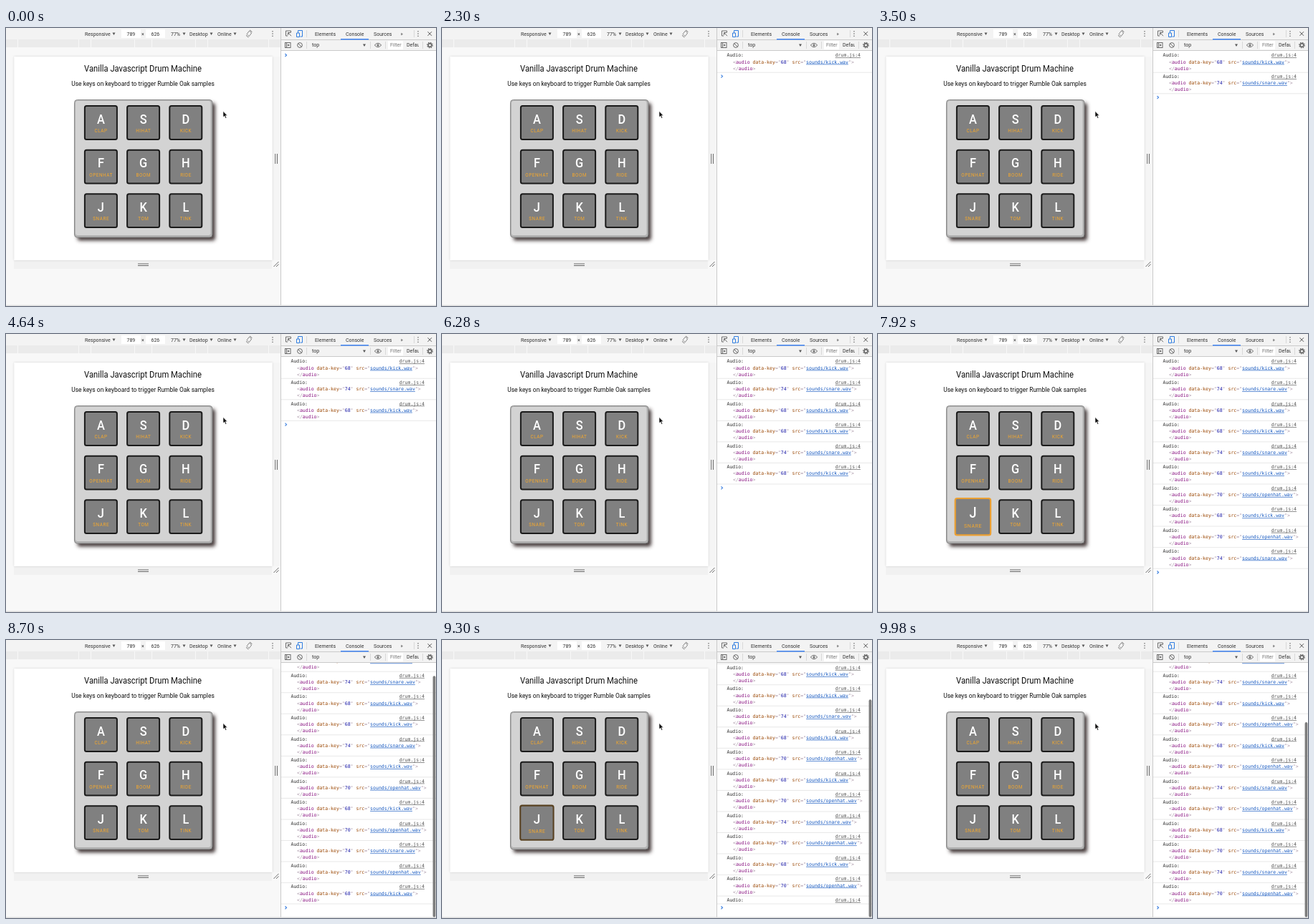
An HTML page that plays this animation: 600 px wide and 389 px high, repeating every 10000 ms.

```html
<!DOCTYPE html>
<html lang="en">
<head>
<meta charset="utf-8">
<title>Drum Machine</title>
<style>
html, body { margin: 0; width: 100%; height: 100%; overflow: hidden; background: #f8f8f8; }
svg { display: block; width: 600px; height: 389px; }
text { white-space: pre; }
.ui text { font: 7px Roboto, sans-serif; fill: #333; }
.page text { font-family: Roboto, sans-serif; text-anchor: middle; }
.log text { font: 6.53px "DejaVu Sans Mono", monospace; fill: #a894a6; }
.log .msg { fill: #303030; }
.log .file { fill: #555; text-anchor: end; text-decoration: underline; }
.tag { fill: #881280; }
.attr { fill: #994500; }
.val { fill: #1a1aa6; }
.link { fill: #1558c0; text-decoration: underline; }
.icon { fill: none; stroke: #6a6a6a; stroke-width: 1; }
</style>
</head>
<body>
<svg viewBox="0 0 600 389">
  <defs>
    <filter id="pageShadow" x="-5%" y="-5%" width="110%" height="110%">
      <feDropShadow dx="0" dy="0" stdDeviation="1.6" flood-opacity=".16"/>
    </filter>
    <filter id="boardShadow" x="-10%" y="-10%" width="125%" height="125%">
      <feDropShadow dx="4" dy="4.5" stdDeviation="2.6" flood-color="#352b2b" flood-opacity=".9"/>
    </filter>
    <linearGradient id="edge" x2="1" y2="1">
      <stop offset="0" stop-color="#8c8c8c"/>
      <stop offset=".5" stop-color="#858585"/>
      <stop offset="1" stop-color="#6f6f6f"/>
    </linearGradient>
    <clipPath id="logArea"><rect x="384" y="32" width="216" height="356"/></clipPath>
    <clipPath id="levels"><rect x="556" y="17" width="20" height="14"/></clipPath>
  </defs>

  <rect width="384" height="389" fill="#f8f8f8"/>
  <rect x="11" y="325" width="360" height="12" fill="#f1f1f1"/>
  <rect x="371" y="40" width="12" height="285" fill="#f5f5f5"/>
  <rect x="11.5" y="40" width="360" height="285" fill="#fff" filter="url(#pageShadow)"/>
  <g class="icon" stroke-width=".9">
    <path d="M184 330h15M184 332.5h15M375.7 176v14M378.5 176v14M373.5 334l7-7M377 334l3.5-3.5"/>
  </g>

  <g class="page" id="page">
    <rect x="95.5" y="100.5" width="192.5" height="192.5" rx="4" fill="#b2b2b2" filter="url(#boardShadow)"/>
    <rect x="97" y="102" width="188.5" height="188" rx="3" fill="#d3d3d3"/>
    <rect x="95.5" y="100.5" width="192.5" height="192.5" rx="4" fill="none" stroke="url(#edge)"/>
  </g>
  <path d="M303 116.5v8.3l1.9-1.7 1.4 3.2 1.4-.6-1.4-3.1h2.5z" fill="#111" stroke="#fff" stroke-width=".5"/>

  <g class="ui" id="ui">
    <rect width="384" height="16" fill="#f3f3f3"/>
    <rect y="16" width="384" height="11" fill="#ebebeb"/>
    <path d="M16.5 16v11M101.5 16v11M118.5 16v11M179.5 16v11M203.5 16v11M264.5 16v11M281.5 16v11M366.5 16v11" stroke="#f8f8f8"/>
    <rect x="161" y="2" width="27" height="12" fill="#fff"/>
    <rect x="195" y="2" width="27" height="12" fill="#fff"/>
    <rect x="384" width="216" height="389" fill="#fff"/>
    <rect x="384" width="216" height="31.5" fill="#f3f3f3"/>
    <path d="M384 16.5h216M384 31.5h216M383.5 0v389" stroke="#cacaca"/>
    <path d="M419.5 3v10M569.5 3v10M419.5 19v10M508.5 19v10M529.5 19v10M581.5 19v10" stroke="#d2d2d2" stroke-width=".8"/>
    <rect x="467" y="15" width="39" height="1.5" fill="#4285f4"/>
    <rect x="533" y="18" width="21" height="12" fill="#fff"/>

    <g class="icon">
      <path d="M336 8.5l3.5-4.5 3.2 3-3.6 4.6zM340 3a5 5 0 0 1 3.3 3M338.5 13a5 5 0 0 1-3.3-3" stroke-width=".8"/>
      <path d="M393 11h-2.5V4h7v2.5M393.5 6.5l4.5 4.7M393.5 10V6.5H397" />
      <path d="M407.5 7V3.5h6v8.5h-3M405.5 7h4v5.5h-4z" stroke="#2f7de1"/>
      <path d="M588.5 5.2l5.5 5.6M594 5.2l-5.5 5.6" stroke="#555"/>
      <rect x="389.5" y="20.5" width="7.5" height="7"/>
      <path d="M391.5 20.5v7"/>
      <path d="M393 22.2v3.6l2.8-1.8z" fill="#6a6a6a" stroke="none"/>
      <circle cx="410" cy="24" r="3.4"/>
      <path d="M407.6 21.6l4.8 4.8"/>
      <path d="M514.3 24q4.7-5.4 9.4 0q-4.7 5.4-9.4 0z"/>
      <circle cx="519" cy="24" r="1.5" fill="#6a6a6a" stroke="none"/>
      <circle cx="591.5" cy="24" r="2.4" stroke-width="1.7"/>
      <circle cx="591.5" cy="24" r="3.8" stroke-dasharray="1.5 1.485" stroke-width="1.2"/>
    </g>
  </g>

  <g class="log" clip-path="url(#logArea)">
    <g id="log"></g>
    <path id="prompt" d="M389.5 -2l2 2-2 2" fill="none" stroke="#3b7fe0" stroke-width="1.1"/>
    <rect id="thumb" x="595.6" width="3.8" rx="1.9" fill="#7d7d7d"/>
  </g>
  <rect y="387.6" width="600" height="1.4" fill="#dedede"/>
</svg>

<script>
const LOOP = 10000, PRESS = 70, EXPAND = 40;
const ROW = 29.55, SHORT_ROW = 11, TOP = 38, LAST = 374.5, VIEW = 355;
const CONDENSED = 0.885;

const keys = [
  ['A', 'CLAP'], ['S', 'HIHAT'], ['D', 'KICK'],
  ['F', 'OPENHAT'], ['G', 'BOOM'], ['H', 'RIDE'],
  ['J', 'SNARE'], ['K', 'TOM'], ['L', 'TINK']
];

// [time in ms, key]
const hits = [
  [1500, 'D'], [2700, 'J'], [4300, 'D'], [5300, 'D'], [5690, 'J'],
  [6080, 'D'], [6760, 'F'], [7120, 'D'], [7490, 'F'], [7860, 'J'],
  [8190, 'F'], [8560, 'D'], [8925, 'F'], [9290, 'J'], [9650, 'F']
];

const $ = id => document.getElementById(id);

function add(parent, name, attrs = {}, html = '') {
  const el = document.createElementNS('http://www.w3.org/2000/svg', name);
  for (const k in attrs) el.setAttribute(k, attrs[k]);
  el.innerHTML = html;
  return parent.appendChild(el);
}

function condensed(parent, str, x, y, size, fill, extra = {}) {
  return add(parent, 'text', {
    transform: `translate(${x} ${y}) scale(${CONDENSED} 1)`,
    'font-size': size, fill, ...extra
  }, str);
}

function buildPage() {
  const page = $('page');
  condensed(page, 'Vanilla Javascript Drum Machine', 191, 60.6, 12.7, '#111');
  condensed(page, 'Use keys on keyboard to trigger Rumble Oak samples', 191, 80.6, 9.58, '#111');
  const pads = {};
  keys.forEach(([letter, sound], i) => {
    const x = 132.4 + (i % 3) * 59.2;
    const y = 132.5 + Math.floor(i / 3) * 61.6;
    const g = add(page, 'g');
    const box = add(g, 'rect', {
      x: -22.5, y: -23.4, width: 45, height: 46.8, rx: 2.5, fill: '#808080', 'stroke-width': 2
    });
    condensed(g, letter, 0, 1.2, 18.5, '#fff', { 'font-weight': 500 });
    condensed(g, sound, 0.2, 13.7, 7.2, '#f5a82c', { 'letter-spacing': 0.65 });
    pads[letter] = { g, box, x, y };
  });
  return pads;
}

function buildToolbars() {
  const ui = $('ui');
  const label = (str, x, y, fill = '#333') => add(ui, 'text', { x, y, style: `fill:${fill}` }, str);
  const arrow = (x, y) => add(ui, 'path', { d: `M${x} ${y}h4l-2 3.4z`, fill: '#555' });
  const dots = x => [4.7, 8, 11.3].forEach(cy => add(ui, 'circle', { cx: x, cy, r: 0.8, fill: '#666' }));

  [['Responsive', 110], ['789', 168.5], ['×', 189], ['626', 202.5], ['77%', 230],
   ['Desktop', 256], ['Online', 295]].forEach(([s, x]) => label(s, x, 10.7));
  [148.5, 246.5, 284.5, 317.5].forEach(x => arrow(x, 6.6));
  dots(372);
  dots(575);
  label('Elements', 431, 10.7);
  label('Console', 474, 10.7);
  label('Sources', 513, 10.7);
  label('»', 550.5, 10.7);
  label('top', 427, 26.4);
  arrow(498, 22.6);
  label('Filter', 536, 26.4, '#777');
  label('Default levels', 559, 26.4).setAttribute('clip-path', 'url(#levels)');
}

function buildLog() {
  const sounds = Object.fromEntries(keys);
  const span = (cls, s) => `<tspan class="${cls}">${s}</tspan>`;
  return hits.map(([time, key]) => {
    const g = add($('log'), 'g');
    add(g, 'text', { x: 397.5, y: 2.4, class: 'msg' }, 'Audio:');
    add(g, 'text', { x: 584, y: 2.4, class: 'file' }, 'drum.js:4');
    const body = add(g, 'g');
    add(body, 'text', { x: 406, y: 11.6 },
      '&lt;' + span('tag', 'audio') + ' ' + span('attr', 'data-key') + '="' +
      span('val', key.charCodeAt(0)) + '" ' + span('attr', 'src') + '="' +
      span('link', `sounds/${sounds[key].toLowerCase()}.wav`) + '"&gt;');
    add(body, 'text', { x: 406, y: 20.6 }, '&lt;/' + span('tag', 'audio') + '&gt;');
    const line = add(g, 'path', { d: 'M384 0h216', stroke: '#e6e6e6', 'stroke-width': 0.9 });
    return { g, body, line, time };
  });
}

const pads = buildPage();
buildToolbars();
const rows = buildLog();
const mix = (a, b, p) => Math.round(a + (b - a) * p);

function drawPads(t) {
  for (const key in pads) {
    const { g, box, x, y } = pads[key];
    let p = 0;
    for (const [time, k] of hits) {
      const age = t - time;
      if (k === key && age >= 0 && age < 2 * PRESS) p = 1 - Math.abs(age / PRESS - 1);
    }
    p = 1 - (1 - p) ** 2;
    g.setAttribute('transform', `translate(${x} ${y}) scale(${1 + 0.1 * p})`);
    box.setAttribute('stroke', `rgb(${mix(26, 240, p)},${mix(26, 162, p)},${mix(26, 50, p)})`);
  }
}

function drawLog(t) {
  let y = TOP;
  for (const { g, body, line, time } of rows) {
    const open = t >= time + EXPAND;
    g.style.display = t >= time ? '' : 'none';
    if (t < time) continue;
    const height = open ? ROW : SHORT_ROW;
    body.style.display = open ? '' : 'none';
    line.setAttribute('transform', `translate(0 ${height - 5.3})`);
    g.setAttribute('transform', `translate(0 ${y})`);
    y += height;
  }
  const scroll = Math.max(0, y - LAST);
  const ratio = VIEW / (VIEW + scroll);
  $('log').setAttribute('transform', `translate(0 ${-scroll})`);
  $('prompt').setAttribute('transform', `translate(0 ${y - scroll})`);
  $('thumb').style.display = scroll ? '' : 'none';
  $('thumb').setAttribute('y', 33 + scroll * ratio);
  $('thumb').setAttribute('height', VIEW * ratio);
}

const start = performance.now();
function tick() {
  const t = (performance.now() - start) % LOOP;
  drawPads(t);
  drawLog(t);
  requestAnimationFrame(tick);
}
tick();
</script>
</body>
</html>
```
